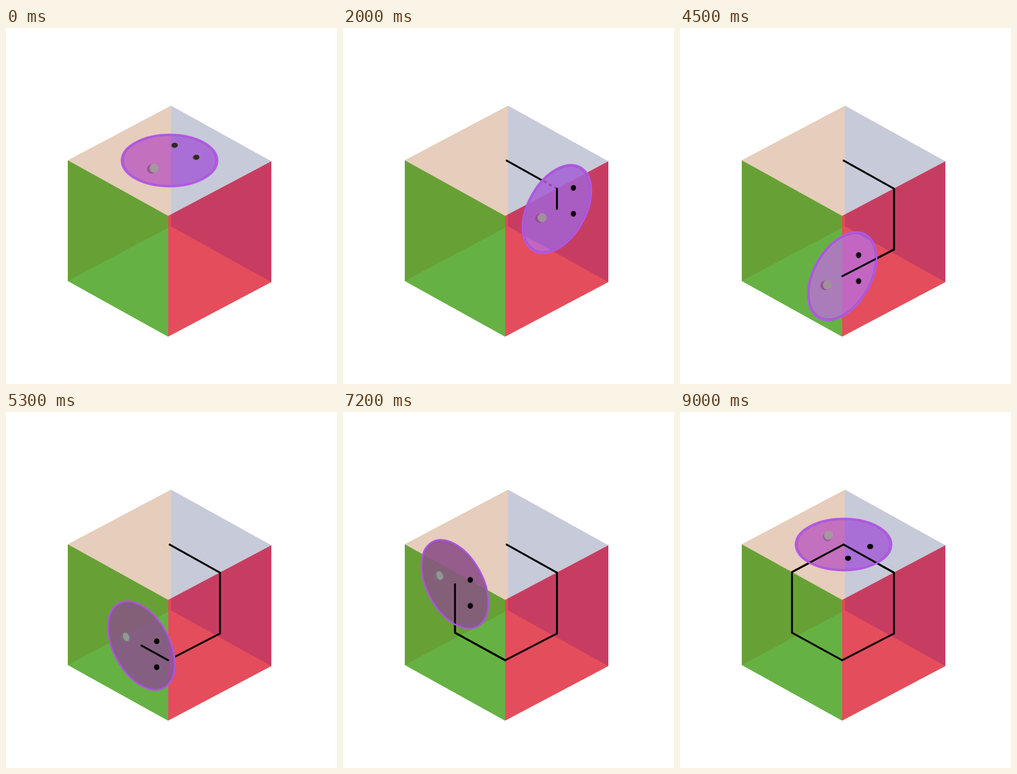
These frames come from a looping animation (600x646 px, 9.1 s). An HTML page with a canvas:

```html
<!DOCTYPE html>
<html>
<head>
<meta charset="utf-8">
<style>
  html, body { margin: 0; height: 100%; overflow: hidden; background: #fff; }
  canvas { display: block; }
</style>
</head>
<body>
<canvas width="600" height="646"></canvas>
<script>
const ctx = document.querySelector('canvas').getContext('2d');
const STEP = 100, FRAMES = 91, PER_EDGE = 15;

// Half edges of the cube as seen on screen
const U = [93.5, -49.5], V = [-91, -50.5], W = [0, 109.5], BACK_V = [91, 50.5];

// Visible regions, painted in order; the top ones reach a little under the sides
const REGIONS = [
  [[112, 240], [299, 141], [481, 242], [294, 343]],
  [[299, 141], [481, 242], [299, 340]],
  [[112, 240], [294, 341], [294, 560], [112, 459]],
  [[112, 459], [294, 362.5], [294, 560]],
  [[294, 341], [481, 242], [481, 461], [294, 560]],
  [[299, 338.4], [481, 242], [481, 461], [299, 360]],
  [[294, 341], [299, 338.4], [299, 360], [294, 362.5]]
];
const CUBE = ['#e6cdbc', '#c7cad8', '#67a135', '#66b144', '#e44d5b', '#c73d62', '#e24a54'];

const PURPLE = ['#c370be', '#a96fd6', '#a878b4', '#aa7cb9', '#c266c2', '#a95dc3', '#c266c2'];
const PLUM = ['#965c8c', '#8a5c9c', '#835f78', '#845f82', '#965494', '#8f5290', '#965494'];

// p: the way the disc looks, q: across, lift: balls off the face, under: tinted half of a ball
const TOP = { lift: [0, -1.5], under: [-1, 3], colors: PURPLE, rim: '#b45ae4', inner: '#a458d2',
  ball: '#a5989f', shade: '#a35cae', bead: [5.6, 4.6] };
const START = { ...TOP, p: U, q: V, dot: '#2a2c1e', under: [-3.5, 1.5], shade: '#98588c' };
const RED = { p: U, q: W, lift: [1, 0.5], under: [-3, 1], colors: PURPLE, rim: '#b058e6',
  inner: '#a754cf', ball: '#a0909a', shade: '#964f94', bead: [4.6, 5.3], dot: '#0b070b' };
const GREEN = { p: BACK_V, q: W, lift: [-0.5, 0], under: [0, 0], colors: PLUM, rim: '#aa59d2',
  inner: '#8f55a8', ball: '#92998e', shade: '#7c6a82', bead: [4.9, 5.3], dot: '#060406' };
const END = { ...TOP, p: BACK_V, q: U, dot: '#000' };

const POSES = [START, RED, RED, GREEN, GREEN, END];
const SIDES = ['top', 'red', 'red', 'green', 'green', 'top'];
const ROUTE = [[296.5, 240.5], [387.8, 291.5], [387.8, 402], [294, 450.5], [203, 400.5], [203, 290.5], [296.5, 240.5]];

function drawCube(colors) {
  REGIONS.forEach((points, i) => {
    ctx.beginPath();
    points.forEach(p => ctx.lineTo(...p));
    ctx.closePath();
    ctx.fillStyle = colors[i];
    ctx.fill();
  });
}

function along(s) {
  const i = Math.min(5, Math.floor(s)), k = s - i, [x, y] = ROUTE[i], [nx, ny] = ROUTE[i + 1];
  return [x + (nx - x) * k, y + (ny - y) * k];
}

function drawTrail(s, color, shown) {
  ctx.strokeStyle = color;
  ctx.lineWidth = 3.4;
  ctx.lineCap = color === '#000' ? 'round' : 'butt';
  for (let i = 0; i < s; i++) {
    if (!shown(i)) continue;
    ctx.beginPath();
    ctx.moveTo(...ROUTE[i]);
    ctx.lineTo(...along(Math.min(s, i + 1)));
    ctx.stroke();
  }
}

function discPath([x, y], { p, q }, r) {
  ctx.save();
  ctx.transform(...p, ...q, x, y);
  ctx.beginPath();
  ctx.arc(0, 0, r, 0, 7);
  ctx.restore();
}

function strokeDisc(center, pose, r, color, width) {
  discPath(center, pose, r);
  ctx.strokeStyle = color;
  ctx.lineWidth = width;
  ctx.stroke();
}

function oval(x, y, rx, ry, color, tilt = 0) {
  ctx.beginPath();
  ctx.ellipse(x, y, rx, ry, tilt, 0, 7);
  ctx.fillStyle = color;
  ctx.fill();
}

function drawBalls(center, pose) {
  const { p, q, lift, under, bead: [rx, ry] } = pose;
  const place = (a, b) => [0, 1].map(i => center[i] + a * p[i] + b * q[i] + lift[i]);
  for (const side of [-0.215, 0.215]) {
    const [x, y] = place(0.31, side);
    oval(x + under[0] / 2, y + under[1] / 2, rx, ry, pose.shade);
    oval(x, y, rx, ry, pose.dot);
  }
  const [x, y] = place(-0.31, 0);
  if (pose === GREEN) {
    oval(x, y, 9.5, 9.8, pose.shade);
    oval(x + 1, y, 5.5, 8, pose.ball, -0.4);
  } else {
    oval(x + under[0], y + under[1], 8.5, 8.5, pose.shade);
    oval(x + 1, y, 8.2, 8.2, pose.ball);
  }
}

function draw(s) {
  const leg = Math.max(0, Math.ceil(s) - 1), pose = POSES[leg], center = along(s);
  const sameSide = i => SIDES[i] === SIDES[leg];

  ctx.fillStyle = '#fff';
  ctx.fillRect(0, 0, 600, 646);
  drawCube(CUBE);
  drawTrail(s, '#000', () => true);

  ctx.save();
  discPath(center, pose, 0.67);
  ctx.clip();
  ctx.fillStyle = '#c48be6';
  ctx.fillRect(0, 0, 600, 646);
  drawCube(pose.colors);
  ctx.setLineDash([6, 5]);
  drawTrail(s, '#a045ae', i => !sameSide(i));
  ctx.restore();

  strokeDisc(center, pose, 0.645, pose.inner, 2);
  drawTrail(s, '#000', sameSide);
  strokeDisc(center, pose, 0.667, pose.rim, 3);
  drawBalls(center, pose);
}

const begin = performance.now();
function tick() {
  const frame = Math.floor((performance.now() - begin) / STEP) % FRAMES;
  draw(frame / PER_EDGE);
  requestAnimationFrame(tick);
}
tick();
</script>
</body>
</html>
```
